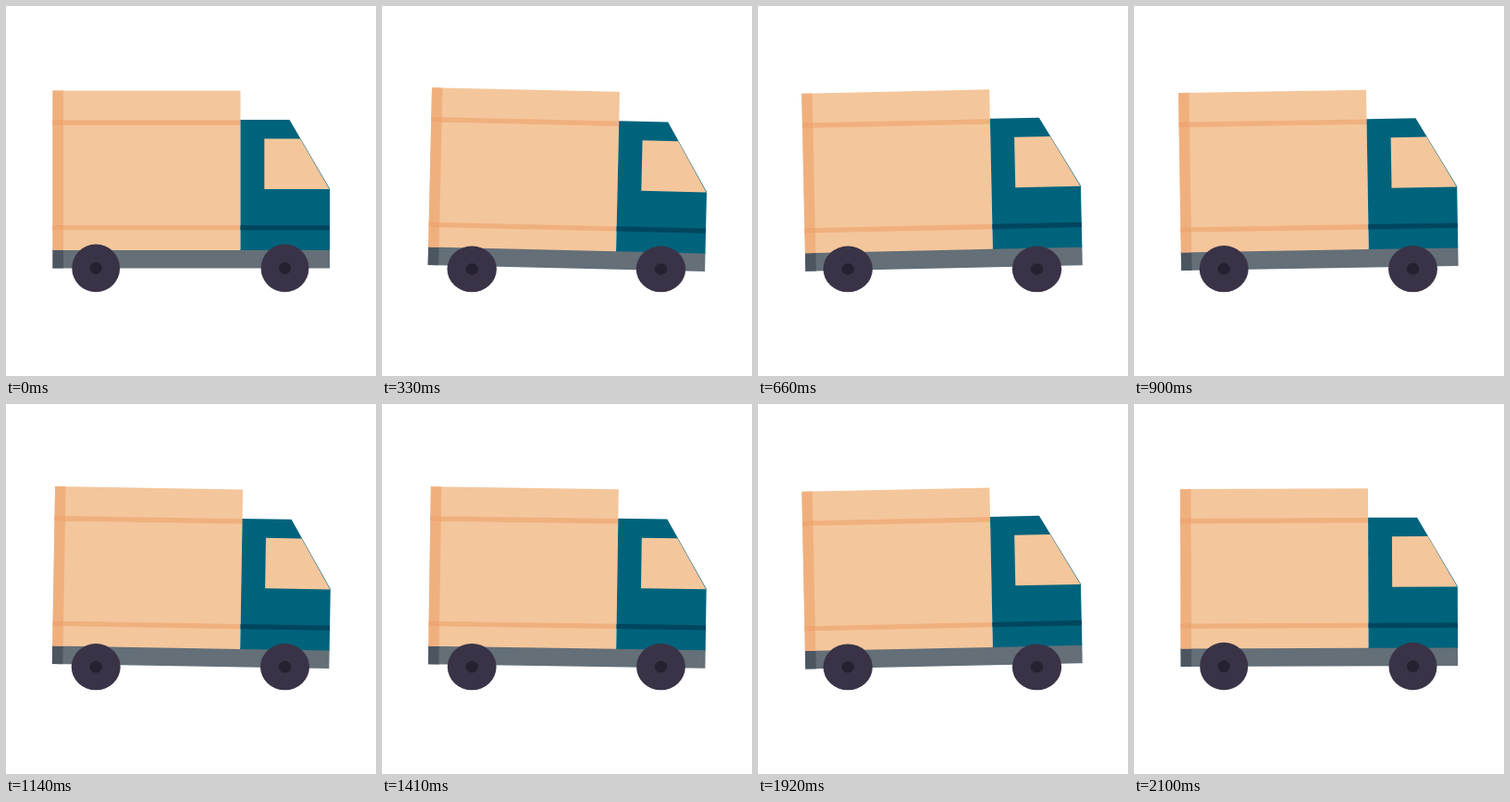
Write an HTML page that moves like this. It is 400 px wide and 400 px high and loops after 2130 ms.

```html
<!DOCTYPE html>
<html lang="en">
<head>
<meta charset="utf-8">
<title>Delivery truck</title>
<style>
  html, body { margin: 0; width: 100%; height: 100%; overflow: hidden; background: #fff; }
  svg { display: block; width: 100%; height: 100%; }
</style>
</head>
<body>
<svg viewBox="0 0 400 400">
  <defs>
    <g id="wheel">
      <circle r="25.9" fill="#3a3347"/>
      <circle r="6.5" fill="#272030"/>
    </g>
  </defs>
  <g id="truck">
    <path fill="#646f78" d="M50.5 263H350V283.5H50.5z"/>
    <path fill="#4b5661" d="M50.5 263H62V283.5H50.5z"/>
    <path fill="#f4c69b" d="M50.5 91.5H253.5V264H50.5z"/>
    <path fill="#f0b07e" d="M50.5 91.5H62V264H50.5zM62 123.3H253.5V128.7H62zM62 237H253.5V242.3H62z"/>
    <path fill="#eea673" d="M50.5 123.3H62V128.7H50.5zM50.5 237H62V242.3H50.5z"/>
    <path fill="#00637c" d="M253.5 123H306.5L350 197.5V264H253.5z"/>
    <path fill="#00465e" d="M253.5 237H350V242.3H253.5z"/>
    <path fill="#f4c69b" d="M279.3 143.5H318L349.6 198H279.3z"/>
  </g>
  <use href="#wheel" class="wheel" data-x="97.2"/>
  <use href="#wheel" class="wheel" data-x="301.5"/>
</svg>
<script>
  const LOOP = 2130, STEP = 30, GROUND = 309.3, RADIUS = 25.9;
  // Rocking turning points: [time in ms, tilt in degrees]
  const keys = [[0, 0], [285, 1.36], [750, -1.5], [1265, 1.36], [1790, -1.45], [LOOP, 0]];
  const truck = document.getElementById('truck');
  const wheels = document.querySelectorAll('.wheel');

  function tiltAt(t) {
    const i = keys.findIndex(k => t < k[0]);
    const [t0, a] = keys[i - 1], [t1, b] = keys[i];
    const p = (t - t0) / (t1 - t0);
    if (i === 1) return b * Math.sin(p * Math.PI / 2);
    if (i === keys.length - 1) return a * Math.cos(p * Math.PI / 2);
    return a + (b - a) * (1 - Math.cos(p * Math.PI)) / 2;
  }

  function draw(now) {
    const t = Math.floor(now % LOOP / STEP) * STEP;
    const tilt = tiltAt(t);
    truck.setAttribute('transform', `rotate(${tilt} 200 245)`);

    // Wheels squash against the ground as the body leans
    const squash = Math.abs(tilt);
    const sx = 1 + 0.024 * squash, sy = 1 - 0.031 * squash;
    for (const w of wheels)
      w.setAttribute('transform', `translate(${w.dataset.x} ${GROUND - RADIUS * sy}) scale(${sx} ${sy})`);
  }

  let start;
  function frame(now) {
    start ??= now;
    draw(now - start);
    requestAnimationFrame(frame);
  }
  draw(0);
  requestAnimationFrame(frame);
</script>
</body>
</html>
```
